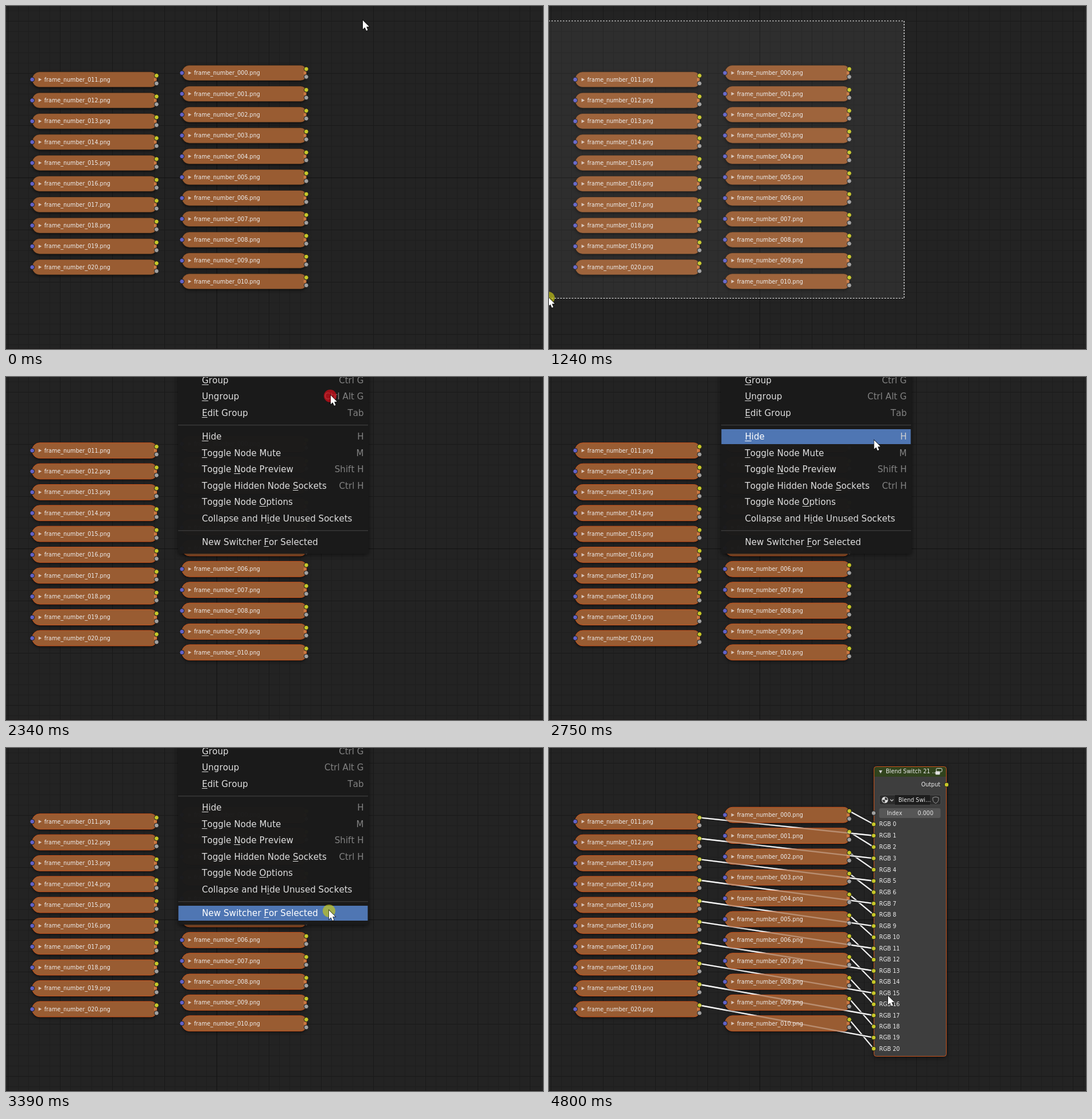
Write an HTML page with a canvas that moves like this. It is 936 px wide and 598 px high and loops after 7200 ms.

```html
<!DOCTYPE html>
<html>
<head>
<meta charset="utf-8">
<style>
html, body { margin: 0; width: 100%; height: 100%; overflow: hidden; background: #232323; }
canvas { display: block; }
</style>
</head>
<body>
<canvas id="stage" width="936" height="598"></canvas>
<script>
const c = document.getElementById('stage').getContext('2d');
const LOOP = 7200, SMALL = 9.6, LARGE = 15.1, ORANGE = '#c9531c';
const YELLOW = '#c7c729', GREY = '#a1a1a1', BLUE = '#6363c7';
c.fontKerning = 'none';

// Pointer waypoints: time, x, y
const path = [
  [130, 622, 25], [900, 37, 463], [1100, -1, 508], [1240, -1, 508],
  [1940, 560, 52], [2010, 566, 32], [2610, 566, 32], [2960, 568, 254],
  [3170, 563, 283], [3710, 563, 283], [4330, 589, 423], [4540, 591, 432]
];

// Menu rows: y, label, index of the underlined letter, shortcut
const menuRows = [
  [5.5, 'Group', 0, 'Ctrl G'], [34, 'Ungroup', 0, 'Ctrl Alt G'], [62.5, 'Edit Group', 0, 'Tab'],
  [104, 'Hide', 0, 'H'], [132.5, 'Toggle Node Mute', 0, 'M'],
  [161, 'Toggle Node Preview', 7, 'Shift H'], [189.5, 'Toggle Hidden Node Sockets', 19, 'Ctrl H'],
  [218, 'Toggle Node Options', 12, ''], [246.5, 'Collapse and Hide Unused Sockets', 14, ''],
  [288, 'New Switcher For Selected', 13, '']
];

const nodes = [];
for (let i = 0; i < 21; i++) {
  const left = i > 10;
  nodes.push({
    x: left ? 45.7 : 306.7,
    y: (left ? 128.2 : 116.7) + 36.35 * (left ? i - 11 : i),
    label: `frame_number_${String(i).padStart(3, '0')}.png`,
    input: left ? 2 * (i - 11) + 1 : 2 * i
  });
}
const inputY = i => 133 + 19.83 * i - 0.0135 * i * i;

// Moves advance in steps of about 70 ms
function pointer(t) {
  let i = path.findIndex(p => p[0] > t);
  if (i === 0) return path[0].slice(1);
  if (i < 0) return path[path.length - 1].slice(1);
  const [t0, x0, y0] = path[i - 1], [t1, x1, y1] = path[i];
  const n = Math.round((t1 - t0) / 70);
  const k = Math.floor((t - t0) / (t1 - t0) * n) / n;
  const e = k * k * (3 - 2 * k);
  return [x0 + (x1 - x0) * e, y0 + (y1 - y0) * e];
}

function box(x, y, w, h, r, fill, stroke) {
  c.beginPath();
  c.roundRect(x, y, w, h, r);
  if (fill) { c.fillStyle = fill; c.fill(); }
  if (stroke) { c.strokeStyle = stroke; c.lineWidth = 1; c.stroke(); }
}

function shadowed(blur, draw) {
  c.save();
  c.shadowColor = 'rgba(0,0,0,.6)';
  c.shadowBlur = blur;
  c.shadowOffsetY = 2;
  draw();
  c.restore();
}

function text(s, x, y, size, fill, align = 'left', mark = -1) {
  c.font = size + 'px "DejaVu Sans", sans-serif';
  c.textAlign = align;
  c.fillStyle = fill;
  c.fillText(s, x, y + size * .36);
  if (mark >= 0) {
    const start = align === 'center' ? x - c.measureText(s).width / 2 : x;
    c.fillRect(start + c.measureText(s.slice(0, mark)).width, Math.round(y + 7),
      c.measureText(s[mark]).width, 1);
  }
}

function poly(points, fill, stroke, width = 1) {
  c.beginPath();
  points.forEach(([x, y]) => c.lineTo(x, y));
  c.lineWidth = width;
  if (fill) { c.closePath(); c.fillStyle = fill; }
  if (stroke) { c.strokeStyle = stroke; c.stroke(); }
  if (fill) c.fill();
}

function dot(x, y, r, fill, stroke) {
  c.beginPath();
  c.arc(x, y, r, 0, 7);
  c.fillStyle = fill;
  c.fill();
  if (stroke) { c.strokeStyle = stroke; c.lineWidth = 1; c.stroke(); }
}
const socket = (x, y, fill) => dot(x, y, 3.9, fill, '#1c1c1c');
const chevron = (x, y, r, width) => poly([[x - r, y - r / 2], [x, y + r / 2], [x + r, y - r / 2]], null, '#d5d5d5', width);

function grid() {
  c.fillStyle = '#232323';
  c.fillRect(0, 0, 936, 598);
  const passes = [[18.2, '#1e1e1e'], [91, '#191919'], [2000, '#121212']];
  for (const [step, color] of passes) {
    c.fillStyle = color;
    for (let x = 367 - step * Math.floor(367 / step); x < 936; x += step) c.fillRect(Math.round(x), 0, 1, 598);
    for (let y = 299 - step * Math.floor(299 / step); y < 598; y += step) c.fillRect(0, Math.round(y), 936, 1);
  }
  c.fillStyle = '#1b1819';
  c.fillRect(0, 597, 936, 1);
}

function fileNode({ x, y, label }, selected) {
  shadowed(5, () => box(x, y - 13.4, 217, 26.8, [13, 10, 10, 13], '#995c32'));
  box(x, y - 13.4, 217, 26.8, [13, 10, 10, 13], null, selected ? ORANGE : 'rgba(25,20,15,.5)');
  poly([[x + 11, y - 3], [x + 16.5, y], [x + 11, y + 3]], '#d9c5b8');
  text(label, x + 21, y, SMALL, '#ededed');
  c.fillStyle = '#e58a4e';
  c.fillRect(x + 212.5, y - 2.5, 1.5, 5);
  c.fillRect(x + 215, y - 2.5, 1.5, 5);
  socket(x, y, BLUE);
  socket(x + 216.7, y + 6.8, GREY);
  socket(x + 216.7, y - 6.8, YELLOW);
}

function links() {
  for (const n of nodes) {
    const line = [[n.x + 216.7, n.y - 6.8], [566, inputY(n.input)]];
    poly(line, null, '#161616', 4);
    poly(line, null, '#ececec', 2.4);
  }
}

function linkGhosts() {
  c.globalAlpha = .3;
  for (const n of nodes.slice(11)) {
    poly([[n.x + 216.7, n.y - 6.8], [566, inputY(n.input)]], null, '#fff', 2.4);
  }
  c.globalAlpha = 1;
}

function switchNode() {
  shadowed(8, () => box(566.5, 32.5, 126, 505, 4, '#3e3e3e'));
  box(566.5, 32.5, 126, 17.5, [4, 4, 0, 0], '#31431d');
  box(566.5, 32.5, 126, 505, 4, null, ORANGE);
  poly([[575, 39], [581, 39], [578, 44.5]], '#cfcfcf');
  text('Blend Switch 21 …', 587, 41, SMALL, '#ededed');
  box(675, 35.5, 10, 6, 1.5, '#31431d', '#e0e0e0');
  box(673.5, 40.5, 8, 6, 1.5, '#e0e0e0');
  text('Output', 682, 64, SMALL, '#ededed', 'right');

  box(576, 82, 107, 17, 3, '#2b2b2b', '#4a4a4a');
  c.fillStyle = '#1d1d1d';
  c.fillRect(603, 82, 61, 17);
  dot(585.5, 90.5, 5.5, '#dedede');
  c.fillStyle = '#333';
  c.beginPath();
  c.moveTo(585.5, 90.5);
  c.arc(585.5, 90.5, 4.5, -Math.PI / 2, 0);
  c.lineTo(585.5, 90.5);
  c.arc(585.5, 90.5, 4.5, Math.PI / 2, Math.PI);
  c.fill();
  chevron(597.5, 91, 2.8, 1.2);
  text('Blend Swi…', 609, 90.5, SMALL, '#e4e4e4');
  c.beginPath();
  c.moveTo(669, 86.5);
  c.quadraticCurveTo(674, 84, 679, 86.5);
  c.quadraticCurveTo(680, 94, 674, 96.5);
  c.quadraticCurveTo(668, 94, 669, 86.5);
  c.strokeStyle = '#9a9a9a';
  c.lineWidth = 1;
  c.stroke();

  box(575.5, 105, 107, 17, 3, '#565656');
  text('Index', 589, 113.5, SMALL, '#e4e4e4');
  text('0.000', 670, 113.5, SMALL, '#e4e4e4', 'right');
  for (let i = 0; i < 21; i++) {
    text('RGB ' + i, 575.5, inputY(i), SMALL, '#ededed');
    socket(566, inputY(i), YELLOW);
  }
  socket(566, 113.5, GREY);
  socket(693, 64, YELLOW);
}

function panel(x, y, w, h) {
  shadowed(8, () => box(x, y, w, h, 4, 'rgba(27,27,27,.95)'));
}

function menu(t, py) {
  panel(300, -20, 332, 328);
  c.fillStyle = '#383838';
  c.fillRect(300, 83, 331, 1.5);
  c.fillRect(300, 267, 331, 1.5);
  const hot = menuRows.reduce((a, b) => Math.abs(b[0] - py) < Math.abs(a[0] - py) ? b : a);
  for (const row of menuRows) {
    const [y, label, mark, keys] = row;
    const on = row === hot && t >= 2410;
    if (on) box(300.5, y - 13, 330, 26, 0, '#4f76b3');
    text(label, 341.5, y, LARGE, on ? '#fff' : '#dedede', 'left', mark);
    text(keys, 623.5, y, LARGE, on ? '#d0d0d0' : '#828282', 'right');
  }
}

function dropdown(label, value, y, py) {
  const hot = Math.abs(py - y) < 14;
  text(label, 514, y, LARGE, '#b0b0b0', 'right');
  box(527.5, y - 14, 249.5, 28, 4, hot ? '#363636' : '#292929', '#555');
  text(value, 537.5, y, LARGE, '#e2e2e2', 'left', 0);
  chevron(768, y + 1, 4.2, 1.6);
}

function dialog(py) {
  panel(341, 279, 444, 182);
  text('New Switcher for Selected Nodes', 349.5, 298, LARGE, '#b0b0b0');
  dropdown('Socket Type', 'RGB', 334, py);
  dropdown('Switching Type', 'Blend', 369.5, py);
  box(527.5, 395, 19.5, 20, 4, '#656565');
  text('Force New', 552, 405, LARGE, '#b0b0b0');
  box(350, 427.5, 427, 26.5, 4, py > 418 ? '#5680c2' : '#4772b3', '#3b4a63');
  text('OK', 563, 440.5, LARGE, '#fff', 'center', 0);
}

function selection(x, y) {
  const w = 619 - x, h = y - 26;
  c.fillStyle = 'rgba(255,255,255,.05)';
  c.fillRect(x, 26, w, h);
  c.lineWidth = 1.2;
  c.strokeStyle = '#111';
  c.strokeRect(x, 26, w, h);
  c.strokeStyle = '#fff';
  c.setLineDash([3, 2]);
  c.strokeRect(x, 26, w, h);
  c.setLineDash([]);
}

function arrow(x, y) {
  const shape = [[0, 0], [0, 15.5], [3.5, 12.3], [6, 18], [8.6, 16.9], [6.2, 11.3], [11, 11]];
  poly(shape.map(([a, b]) => [x + a, y + b]), '#fff', 'rgba(0,0,0,.7)', 1.6);
}

function draw(now) {
  const t = now % LOOP;
  const [x, y] = pointer(t);
  const within = (a, b) => t >= a && t < b;
  const done = t >= 4800;
  grid();
  if (done) links();
  nodes.forEach(n => fileNode(n, t >= 1310));
  if (done) { linkGhosts(); switchNode(); }
  if (within(270, 1310)) selection(x, y + 1.5);
  if (within(2340, 3450)) menu(t, y);
  if (within(3450, 4800)) dialog(y);
  if (within(1240, 1310) || within(3390, 3450) || within(4670, 4800)) dot(x, y + 1, 11, 'rgba(205,205,20,.65)');
  if (within(2340, 2410)) dot(x - 1, y + 1, 11, 'rgba(205,15,25,.75)');
  arrow(x, y);
  requestAnimationFrame(frame);
}

const start = performance.now();
function frame() { draw(performance.now() - start); }
frame();
</script>
</body>
</html>
```
